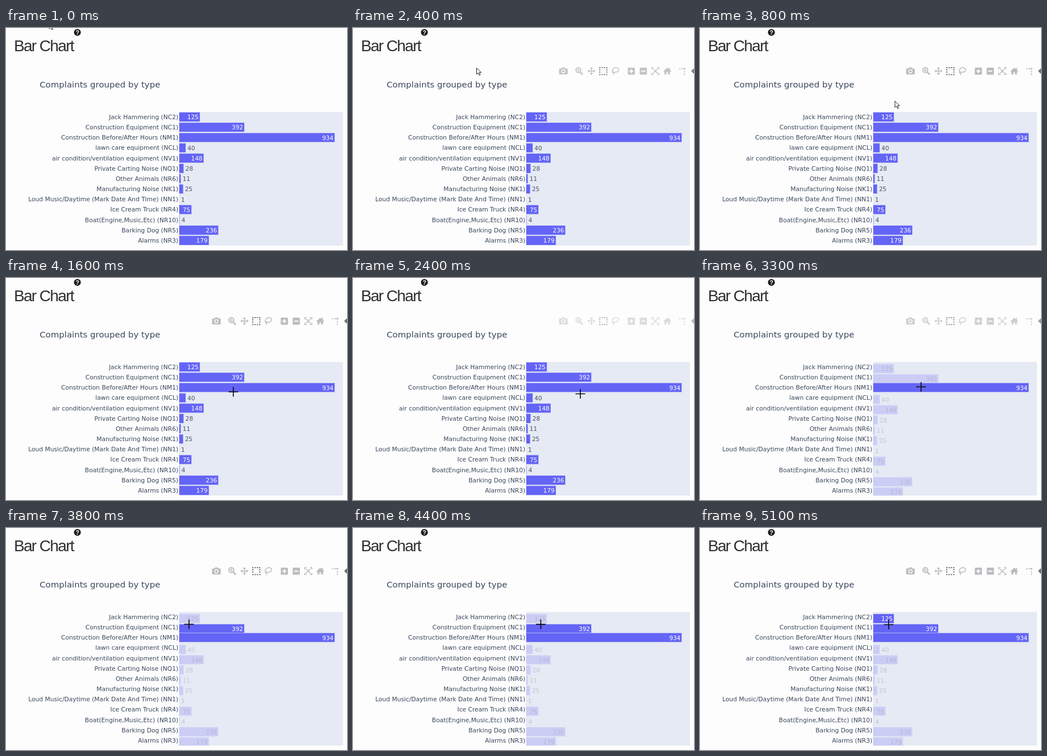
Animation of 600 by 392 pixels, one loop 5.2 s. Source, as an HTML page:

```html
<!DOCTYPE html>
<html lang="en">
<head>
<meta charset="utf-8">
<title>Bar Chart</title>
<style>
html, body { margin: 0; width: 100%; height: 100%; overflow: hidden; background: #fdfdfe; }
svg { display: block; width: 600px; height: 392px; }
.chart { font-family: "DejaVu Sans", Verdana, sans-serif; fill: #3a475a; }
.label { font-size: 10.7px; text-anchor: end; }
.value { font-size: 10.4px; }
.head { font: 28px "Liberation Sans", Arial, sans-serif; letter-spacing: -1.64px; fill: #303032; }
.mark { font: bold 10.5px "Liberation Sans", Arial, sans-serif; text-anchor: middle; fill: #fff; }
</style>
</head>
<body>
<svg viewBox="0 0 600 392">
  <clipPath id="plot"><rect x="304" y="148.4" width="289" height="235.8"/></clipPath>
  <rect width="600" height="392" fill="#fdfdfe"/>
  <text class="head" x="13.9" y="41">Bar Chart</text>
  <circle cx="125.6" cy="7.8" r="6.1" fill="#1c1c1e"/>
  <text class="mark" x="125.6" y="11.6">?</text>
  <g id="bar" fill="none" stroke="#bcbcc0" stroke-width="2">
    <g stroke="none" fill="#bcbcc0">
      <path d="M364 71.5h3l1.2-2h4l1.2 2h3q1.4 0 1.4 1.4v7.6q0 1.4-1.4 1.4h-12.4q-1.4 0-1.4-1.4v-7.6q0-1.4 1.4-1.4z"/>
      <circle cx="370.2" cy="76.5" r="3.7" fill="#fdfdfe"/>
      <circle cx="370.2" cy="76.5" r="2.3"/>
      <rect x="483.5" y="70" width="12.6" height="12.4" rx="1.2"/>
      <rect x="504.5" y="70" width="12.6" height="12.4" rx="1.2"/>
      <path d="M546 76.6l7-6.6 2.8 2.6v-2h2v3.9l2.3 2.1-1 1-1.3-1.1v5.5h-3.5v-3.8h-2.8v3.8h-3.5v-5.5l-1.2 1.1z"/>
      <path d="M419.6 69l3 3.2h-6zM419.6 83l3-3.2h-6zM412.6 76l3.2-3v6zM426.6 76l-3.2-3v6z"/>
    </g>
    <circle cx="396.5" cy="74.3" r="4.3"/>
    <path d="M400 78l4.3 4.3" stroke-width="2.6"/>
    <path d="M394 74.3h5M396.5 71.8v5" stroke-width="1.3"/>
    <path d="M419.6 71v10M414.6 76h10" stroke-width="1.5"/>
    <path d="M433.2 70h14.4M433.2 82.2h14.4M434.2 72.6v8M446.6 72.6v8" stroke="#68686c" stroke-dasharray="2.1 2"/>
    <ellipse cx="461.8" cy="74.2" rx="5.8" ry="4" transform="rotate(-14 461.8 74.2)" stroke-width="1.5"/>
    <path d="M457 77q-1.6 2 .5 2.3q2 .5.7 3.4" stroke-width="1.5"/>
    <path d="M486.3 76.2h7M489.8 72.7v7M507.3 76.2h7" stroke="#fdfdfe"/>
    <path d="M525.6 73.2v-3.3h3.4M534.8 69.9h3.4v3.3M538.2 79v3.3h-3.4M529 82.3h-3.4v-3.3" stroke-width="1.5"/>
    <path d="M528 72.3l7.8 7.6M535.8 72.3l-7.8 7.6" stroke-width="1.5"/>
    <path d="M574 72h6.5" stroke-dasharray="2.2 2"/>
    <path d="M583.2 76v7" stroke-dasharray="2.4 2"/>
    <circle cx="583" cy="72" r="1.8" fill="#bcbcc0" stroke="none"/>
    <path d="M595 76l4-4.2h2v8.4h-2z" fill="#707074" stroke="none"/>
  </g>
  <g class="chart">
    <text x="59.2" y="104.5" font-size="14.95">Complaints grouped by type</text>
    <rect x="304.4" y="148.4" width="288.6" height="235.8" fill="#e5eaf4"/>
    <g id="labels"></g>
    <g id="rows" clip-path="url(#plot)"></g>
  </g>
  <path id="arrow" d="M0 0v11.2l2.6-2.4 2 4.3 1.9-.8-2-4.2h3.6z" fill="#fff" stroke="#222" stroke-width="1"/>
  <path id="cross" d="M-8.5 0h17M0-8.5v17" stroke="#08080c" stroke-width="1.6"/>
</svg>
<script>
const data = [
  ["Jack Hammering (NC2)", 125], ["Construction Equipment (NC1)", 392],
  ["Construction Before/After Hours (NM1)", 934], ["lawn care equipment (NCL)", 40],
  ["air condition/ventilation equipment (NV1)", 148], ["Private Carting Noise (NQ1)", 28],
  ["Other Animals (NR6)", 11], ["Manufacturing Noise (NK1)", 25],
  ["Loud Music/Daytime (Mark Date And Time) (NN1)", 1], ["Ice Cream Truck (NR4)", 75],
  ["Boat(Engine,Music,Etc) (NR10)", 4], ["Barking Dog (NR5)", 236], ["Alarms (NR3)", 179]
];
const LOOP = 5200, STEP = 100, LEFT = 304.6, TOP = 148.8, PITCH = 18.17, SCALE = 0.2934;
const FADES = [100, 2300, 3100, 4400];      // toolbar redraws
const PICKS = { 2: 2500, 1: 3600, 0: 4600 }; // row: time selected
const DIM_AT = 2500, DROP = 2.8;            // unpicked bars dim and sit lower from here on
// time, x, y of the pointer
const track = [
  [0, 76, -10], [100, 92, 12], [700, 343, 129], [900, 343, 129], [1400, 400, 201],
  [1800, 400, 201], [2200, 400, 204.5], [2500, 400, 204.5], [2900, 389, 192.3],
  [3300, 389, 192.3], [3500, 368, 177], [3800, 322, 170], [4100, 322, 168],
  [4500, 332, 170.5], [LOOP, 332, 170.5]
];

const $ = id => document.getElementById(id);
function add(parent, tag, attrs, text) {
  const el = document.createElementNS("http://www.w3.org/2000/svg", tag);
  for (const k in attrs) el.setAttribute(k, attrs[k]);
  if (text !== undefined) el.textContent = text;
  return parent.appendChild(el);
}

const rows = data.map(([name, n], i) => {
  const y = TOP + i * PITCH, end = LEFT + n * SCALE, inside = n >= 75;
  add($("labels"), "text", { class: "label", x: 303.2, y: y + 12.1 }, name);
  const group = add($("rows"), "g", {});
  const rect = add(group, "rect", {
    x: LEFT, y, width: n * SCALE, height: 16.6, stroke: "#e5eaf4", "stroke-width": 0.6
  });
  const value = add(group, "text", {
    class: "value", x: inside ? end - 2.4 : end + 3, y: y + 12.5,
    "text-anchor": inside ? "end" : "start"
  }, n);
  return { group, rect, value, inside };
});

const ease = u => u * u * (3 - 2 * u);

function pointer(t) {
  const i = track.findIndex(p => p[0] > t), [t0, x0, y0] = track[i - 1], [t1, x1, y1] = track[i];
  const u = ease((t - t0) / (t1 - t0));
  return [x0 + (x1 - x0) * u, y0 + (y1 - y0) * u];
}

function draw(time) {
  const t = Math.floor((time % LOOP) / STEP) * STEP;
  const fade = FADES.filter(f => f <= t).pop();
  $("bar").setAttribute("opacity", fade === undefined ? 0 : Math.min(1, Math.sqrt((t - fade) / 400)));

  rows.forEach((r, i) => {
    const dim = t >= DIM_AT && !(t >= PICKS[i]);
    const drop = t >= DIM_AT && PICKS[i] !== DIM_AT ? DROP : 0;
    r.group.setAttribute("transform", `translate(0 ${drop})`);
    r.rect.setAttribute("fill", dim ? "#cbcdf5" : "#6464f6");
    r.value.setAttribute("fill", dim ? (r.inside ? "#b3b5cf" : "#bfc5d2") : r.inside ? "#fff" : "#4a5263");
  });

  const [x, y] = pointer(t), over = x > LEFT && y > TOP;
  for (const [id, on] of [["arrow", !over], ["cross", over]]) {
    $(id).setAttribute("transform", `translate(${x} ${y})`);
    $(id).setAttribute("visibility", on ? "visible" : "hidden");
  }
}

const start = performance.now();
function tick() {
  draw(performance.now() - start);
  requestAnimationFrame(tick);
}
tick();
</script>
</body>
</html>
```
